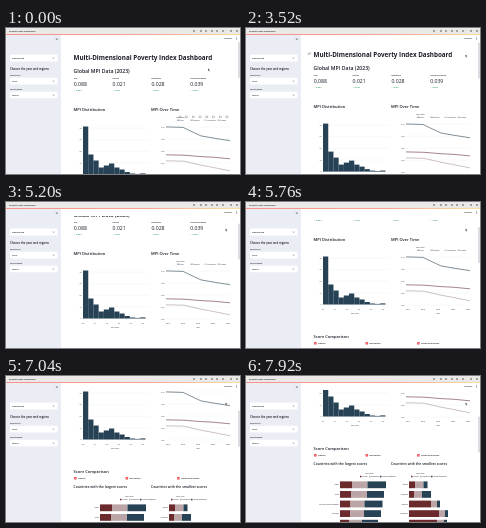
An HTML page for the animation above (8000 ms loop, 234 px wide and 146 px high).

```html
<!DOCTYPE html>
<html lang="en">
<head>
<meta charset="utf-8">
<title>Poverty dashboard</title>
<style>
html, body { margin: 0; width: 100%; height: 100%; overflow: hidden; background: #fff; }
svg { display: block; width: 100vw; height: 100vh; font-family: "Open Sans", "Noto Sans", sans-serif; fill: #1b1d28; }
</style>
</head>
<body>
<svg id="stage" viewBox="0 0 234 146" xmlns="http://www.w3.org/2000/svg">
  <defs>
    <clipPath id="view"><rect x="56" y="14" width="178" height="132"/></clipPath>
    <linearGradient id="ribbon"><stop stop-color="#f7766c"/><stop offset=".6" stop-color="#f98f76"/><stop offset="1" stop-color="#fbd58a"/></linearGradient>
  </defs>
  <rect width="234" height="146" fill="#fff"/>
  <g clip-path="url(#view)"><g id="page"></g></g>
  <g id="frame"></g>
  <rect id="thumb" x="232.4" width="1.2" height="36" rx=".6" fill="#c4c7cf"/>
  <path id="cursor" d="M0 0v2.6l.6-.6.5 1.1.5-.2-.5-1.1h.9z" fill="#111" stroke="#fff" stroke-width=".25"/>
</svg>
<script>
const NAVY = '#264254', MAROON = '#6b2b2d', PINK = '#bba5a6';
const INK = '#1b1d28', GRAY = '#464954', GRID = '#e3e6eb';
const $ = id => document.getElementById(id);

const rect = (x, y, w, h, fill, extra = '') =>
  `<rect x="${x}" y="${y}" width="${w}" height="${h}" fill="${fill}" ${extra}/>`;
const path = (d, stroke, width = .4, extra = '') =>
  `<path d="${d}" fill="none" stroke="${stroke}" stroke-width="${width}" ${extra}/>`;
const text = (x, y, size, label, { weight = 600, fill = INK, anchor = 'start' } = {}) =>
  `<text x="${x}" y="${y}" font-size="${size}" font-weight="${weight}" fill="${fill}" text-anchor="${anchor}">${label}</text>`;
const heading = (x, y, size, label) => text(x, y, size, label);
const tick = (x, y, label, anchor = 'middle') => text(x, y, 1.7, label, { fill: GRAY, anchor });
const linkIcon = (id, x, y) =>
  `<g id="${id}">${path(`M${x} ${y + .6}l1.8-1.8M${x + .5} ${y - .8}l-1 1.1 1 1M${x + 1.3} ${y + .8}l1-1.1-1-1`, GRAY, .35)}</g>`;

function metrics() {
  const items = [['MPI', '0.088', '-0.004'], ['Health', '0.021', '-0.001'],
    ['Education', '0.028', '-0.001'], ['Living Standards', '0.039', '-0.002']];
  return items.map(([name, value, delta], i) => {
    const x = 67.8 + i * 38.8;
    return text(x, 51.2, 2, name) + text(x, 58.2, 5.15, value, { weight: 500 }) +
      text(x, 63, 2.1, '↓ ' + delta, { fill: '#09903b' });
  }).join('');
}

function histogram() {
  const heights = [48, 20, 14, 7, 9, 11, 7, 5, 2.5, 1, .6, 1.1];
  let out = '';
  for (let i = 0; i < 5; i++) {
    const y = 146.5 - i * 11.6;
    out += path(`M77 ${y}h66`, GRID, .3) + tick(75.5, y + .6, i * 10, 'end');
  }
  heights.forEach((h, i) => out += rect(77 + i * 5.2, 146.5 - h, 5.25, h, NAVY));
  for (let i = 0; i < 6; i++) out += tick(77 + i * 12, 151.5, (i / 10).toFixed(1));
  return out + tick(109, 155.5, 'MPI score');
}

function lineChart() {
  const colors = ['#1f3442', '#5a1f26', '#a38d91', GRAY];
  const curves = [
    'M160 98.9L177 99.4 186 103.7 195 107.9 207 110 224 112.7',
    'M160 126.8L178 127.2 195 128.6 207 129.2 224 130.8',
    'M160 132.8L178 133.2 195 137.2 207 139.4 224 142.8'];
  let out = tick(170, 89.5, 'Score type', 'start');
  ['MPI', 'Health', 'Education', 'Living'].forEach((name, i) => {
    const x = 171 + i * 13.5;
    out += path(`M${x} 92.2h3`, colors[i], .5) + tick(x + 3.6, 92.8, name, 'start');
  });
  for (let i = 0; i < 5; i++) {
    const y = 147 - i * 12;
    out += path(`M160 ${y}h64`, GRID, .3) + tick(158.5, y + .6, (i * .03).toFixed(2), 'end');
  }
  curves.forEach((d, i) => out += path(d, colors[i], .55));
  for (let i = 0; i < 5; i++) out += tick(162 + i * 15, 151.5, 2014 + i * 2);
  return out + tick(192, 155.5, 'Year');
}

function modebar() {
  let icons = '';
  for (let i = 0; i < 8; i++) icons += rect(173 + i * 6.7, 88, 2, 1.8, 'none', 'stroke="#8b8e98" stroke-width=".4"');
  return `<g id="modebar">${icons}</g>`;
}

function stackedBars(left, labelX, legendX, rows) {
  let out = tick(legendX, 203.5, 'Score type', 'start');
  ['Health', 'Education', 'Living Standards'].forEach((name, i) => {
    const x = legendX - 5 + [0, 9, 20][i];
    out += rect(x, 205.8, 1.5, 1.5, [MAROON, PINK, NAVY][i]) + tick(x + 2.2, 207.2, name, 'start');
  });
  rows.forEach(([name, ...parts], i) => {
    const y = 211.4 + i * 9.6;
    let x = left;
    out += tick(labelX, y + 4, name, 'end');
    parts.forEach((w, k) => {
      out += rect(x, y, w, 6.8, [MAROON, PINK, NAVY][k]);
      x += w;
    });
  });
  return out;
}

function comparison() {
  let out = heading(67.6, 179.8, 4.02, 'Score Comparison');
  ['Health', 'Education', 'Living Standards'].forEach((name, i) => {
    const x = 68 + i * 51.5;
    out += rect(x, 183.9, 2.6, 2.6, '#f04a4f', 'rx=".5"') +
      path(`M${x + .6} 185.2l.5.6.9-1.1`, '#fff', .35) + text(x + 4, 186.1, 2.3, name);
  });
  return out +
    heading(67.6, 195.3, 3.4, 'Countries with the largest scores') +
    heading(145, 195.3, 3.4, 'Countries with the smallest scores') +
    stackedBars(94, 92.8, 119, [['Niger', 12, 15.5, 18.5], ['Chad', 11, 16, 17],
      ['Central African Republic', 10.5, 14, 18], ['Burundi', 10, 14, 17], ['Mali', 9, 13, 16]]) +
    stackedBars(163, 161.8, 170, [['Serbia', 6, 8.5, 4], ['Armenia', 5, 8, 9],
      ['Ukraine', 22, 6, 3], ['Maldives', 30, 6, 3], ['Jordan', 28, 7, 3]]);
}

$('page').innerHTML =
  linkIcon('titleLink', 62.5, 28.6) +
  text(67.5, 32.2, 6.31, 'Multi-Dimensional Poverty Index Dashboard', { weight: 700 }) +
  heading(67.6, 44.8, 5.15, 'Global MPI Data (2023)') + metrics() +
  heading(67.6, 82.6, 4.02, 'MPI Distribution') + histogram() +
  linkIcon('chartLink', 139.5, 81.2) +
  heading(145, 82.6, 4.02, 'MPI Over Time') + modebar() + lineChart() + comparison();

const selectBox = (y, h, label) => rect(4, y, 47.5, h, '#fff', 'rx="1.2"') +
  text(6, y + h / 2 + .8, 2.3, label) + path(`M46.6 ${y + h / 2 - .4}l.9.9.9-.9`, INK, .4);

$('frame').innerHTML =
  rect(0, 0, 234, 6.2, '#ebe8e8') + text(3, 3.9, 2.2, 'Poverty Index Dashboard') +
  [188, 195, 200, 206, 211, 217, 225, 231].map(x => `<circle cx="${x}" cy="3" r=".8" fill="#444"/>`).join('') +
  rect(0, 6.8, 55, 139.2, '#ebedf4') + rect(0, 6.1, 234, .8, 'url(#ribbon)') +
  path('M50 10.3l1.6 1.6m0-1.6l-1.6 1.6', INK, .4) +
  selectBox(26.5, 7, 'Dashboard') +
  heading(4, 42.2, 2.85, 'Choose the year and regions') +
  text(4, 47.7, 2, 'Select year') + selectBox(49.8, 6.6, '2023') +
  text(4, 61.6, 2, 'Select region') + selectBox(63.7, 6.6, 'World') +
  text(218.5, 11.2, 2.3, 'Deploy') +
  [9.2, 10.4, 11.6].map(y => `<circle cx="230.5" cy="${y}" r=".35"/>`).join('');

// Linear interpolation through [time, value] keys.
function track(keys, t) {
  const next = keys.findIndex(key => key[0] > t);
  if (next < 0) return keys[keys.length - 1][1];
  if (next === 0) return keys[0][1];
  const [t0, v0] = keys[next - 1], [t1, v1] = keys[next];
  return v0 + (v1 - v0) * (t - t0) / (t1 - t0);
}

const scrollKeys = [[3360, 0], [4080, 13], [4560, 21], [4800, 21], [5200, 30],
  [6320, 58], [7040, 83], [7120, 83], [7920, 106]];
const cursorX = [[0, 202], [320, 218], [480, 219.5]];
const cursorY = [[0, 40.5], [320, 28], [480, 26.5]];
const show = (id, on) => $(id).setAttribute('visibility', on ? 'visible' : 'hidden');

function draw(now) {
  const t = Math.floor(now % 8000 / 80) * 80;
  const scroll = track(scrollKeys, t);
  $('page').setAttribute('transform', `translate(0 ${-scroll})`);
  $('thumb').setAttribute('y', 14 + scroll * .25);
  $('cursor').setAttribute('transform', `translate(${track(cursorX, t)} ${track(cursorY, t)})`);
  show('modebar', t < 160);
  show('titleLink', t >= 240 && t < 4640);
  show('chartLink', t >= 6000 && t < 6640);
  requestAnimationFrame(nextFrame);
}
const start = performance.now();
const nextFrame = () => draw(performance.now() - start);
nextFrame();
</script>
</body>
</html>
```
